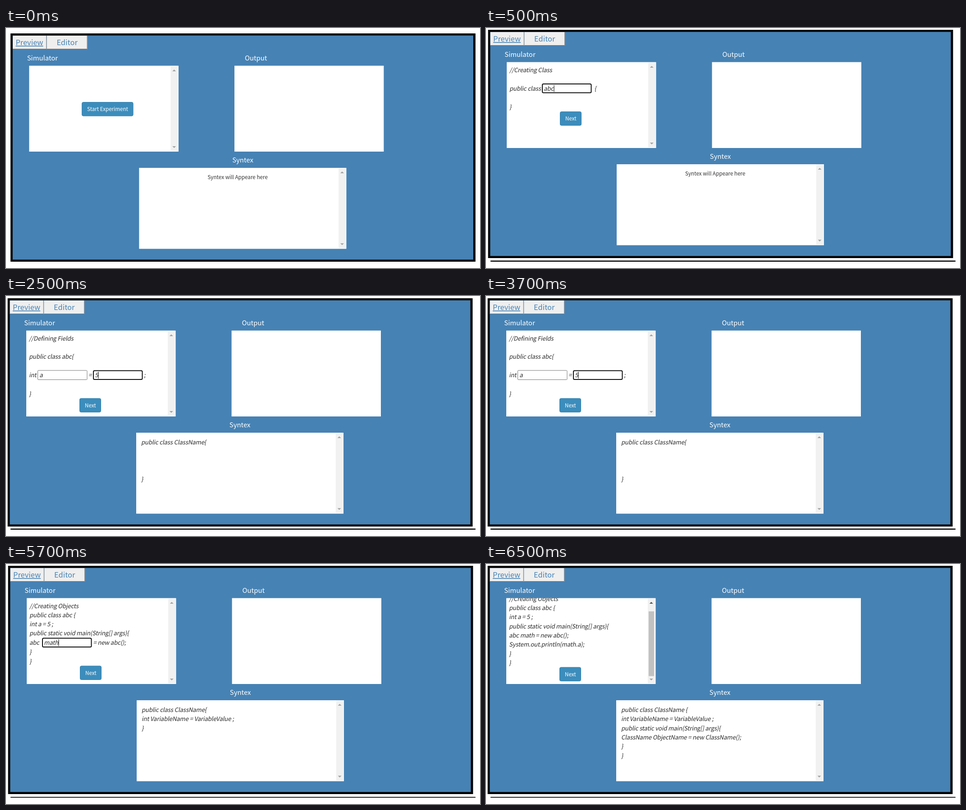
Recreate the animation shown at these times as an HTML page. Size 1052 by 532 pixels, loop 8000 ms.

```html
<!DOCTYPE html>
<html lang="en">
<head>
<meta charset="utf-8">
<title>Class simulator</title>
<style>
html, body { margin: 0; width: 100%; height: 100%; overflow: hidden; background: #fff; }
svg { display: block; width: 1052px; height: 532px; }
text { font-family: "Noto Sans CJK JP", "Noto Sans CJK SC", "Noto Sans CJK KR", "Noto Sans CJK TC", "Noto Sans", sans-serif; }
.tab { font-size: 16.4px; fill: #4682b4; }
.label { font-size: 14.9px; fill: #fff; }
.hint { font-size: 11.7px; fill: #333; }
.btn { font-size: 11.6px; font-weight: 500; fill: #fff; }
.code { font-size: 13.25px; letter-spacing: -.165px; fill: #2b2b2b; }
</style>
</head>
<body>
<svg id="stage" viewBox="0 0 1052 532"></svg>
<script>
const LOOP = 8000, LINE = 20.3;
const stage = document.getElementById('stage');

const rect = (x, y, w, h, fill, more = '') =>
  `<rect x="${x}" y="${y}" width="${w}" height="${h}" fill="${fill}" ${more}/>`;
const text = (kind, x, y, s, more = '') =>
  `<text class="${kind}" x="${x}" y="${y}" ${more}>${s}</text>`;
const code = (x, y, s) =>
  `<text class="code" transform="translate(${x} ${y}) skewX(-11)">${s}</text>`;
const lines = (x, y, list) => list.map((s, i) => code(x, y + i * LINE, s)).join('');

const arrow = (x, y, dir, fill = '#a3a3a3') =>
  `<path d="M${x - 4} ${y + 2 * dir}h8l-4 ${-4 * dir}z" fill="${fill}"/>`;

function scrollbar(x, top, bottom, upFill) {
  return rect(x, top, 16, bottom - top, '#f1f1f1')
    + arrow(x + 7.8, top + 9, 1, upFill) + arrow(x + 7.8, bottom - 8.5, -1);
}

function tab(x, w, textX, s, more) {
  return rect(x, 9, w, 30, '#efefef')
    + `<path d="M${x + w - .5} 9v29.5h${.5 - w}" fill="none" stroke="#767676"/>`
    + text('tab', textX, 30.3, s, more);
}

function button(x, y, w, s) {
  return rect(x + .5, y + .5, w - 1, 30.5, '#3c8dbc', 'rx="3" stroke="#367fa9"')
    + text('btn', x + 12, y + 20.4, s);
}

function input(x, y, s, caret) {
  const look = caret ? 'rx="2.5" stroke="#101010" stroke-width="2"' : 'rx="1.5" stroke="#767676"';
  const pad = caret ? 1 : .5;
  return rect(x + pad, y + pad, 110.5 - 2 * pad, 21.5 - 2 * pad, '#fff', look)
    + code(x + 4.3, y + 15.7, s)
    + (caret ? rect(caret, y + 3.5, 1, 15, '#000') : '');
}

const hint = text('hint', 442, 327, 'Syntex will Appeare here');

// at: start time, dx/dy: window offset, rule: top of the line under the window
const scenes = [
  { at: 0, dx: 5.4, dy: 8,
    sim: button(162.7, 156, 114.5, 'Start Experiment'),
    syntax: hint },
  { at: 500, dx: 0, dy: 0, rule: 515.5,
    sim: code(52, 97.5, '//Creating Class') + code(52, 138.7, 'public class')
      + input(124, 123, 'abc', 150.5) + code(240.5, 138.7, '{') + code(52, 180, '}')
      + button(164, 185, 48, 'Next'),
    syntax: hint },
  { at: 2500, dx: -1, dy: 1, rule: 515.5,
    sim: code(52, 97.5, '//Defining Fields') + code(52, 138, 'public class abc{')
      + code(52, 179.3, 'int') + input(71, 163.5, 'a') + code(184, 179.3, '=')
      + input(194, 163.5, '5', 205.5) + code(307, 179.3, ';') + code(52, 221, '}')
      + button(164, 225.5, 48, 'Next'),
    syntax: code(301, 328, 'public class ClassName{') + code(301, 409.5, '}') },
  { at: 4500, dx: 0, dy: 0, rule: 516.3,
    sim: lines(52, 97.5, ['//Creating Objects', 'public class abc {', 'int a = 5 ;',
        'public static void main(String[] args){'])
      + code(52, 179.2, 'abc') + input(80, 163.5, 'math', 116.5)
      + code(193.5, 179.2, '= new abc();') + lines(52, 200.2, ['}', '}'])
      + button(164, 225.5, 48, 'Next'),
    syntax: lines(301, 328, ['public class ClassName{', 'int VariableName = VariableValue ;', '}']) },
  { at: 6500, dx: -1, dy: 0, rule: 516.3, scrolled: true,
    sim: lines(52, 81.7, ['//Creating Objects', 'public class abc {', 'int a = 5 ;',
        'public static void main(String[] args){', 'abc math = new abc();',
        'System.out.println(math.a);', '}', '}'])
      + button(164, 228.5, 48, 'Next'),
    syntax: lines(301, 328, ['public class ClassName {', 'int VariableName = VariableValue ;',
        'public static void main(String[] args){', 'ClassName ObjectName = new ClassName();', '}', '}']) }
];

function draw(s) {
  const bar = scrollbar(360, 77, 264.5, s.scrolled ? '#505050' : undefined)
    + (s.scrolled ? rect(362, 105, 12, 143.5, '#c1c1c1') : '');
  return (s.rule ? rect(10, s.rule, 1032, 518 - s.rule, '#000') : '')
    + `<g transform="translate(${s.dx} ${s.dy})">`
    + rect(4.6, 4, 1032, 506, '#000') + rect(9.4, 8.6, 1022.2, 496.8, '#4682b4')
    + tab(9.6, 75.2, 16, 'Preview', 'text-decoration="underline"')
    + tab(85.2, 90, 107, 'Editor')
    + text('label', 41.3, 63.8, 'Simulator') + text('label', 524.5, 63.8, 'Output')
    + text('label', 496.8, 290.2, 'Syntex')
    + rect(46, 75.6, 331.5, 190.4, '#fff') + rect(501.6, 75.6, 331.4, 190.4, '#fff')
    + rect(290, 302, 460, 179.5, '#fff')
    + '<clipPath id="view"><rect x="46" y="75.6" width="314" height="190"/></clipPath>'
    + `<g clip-path="url(#view)">${s.sim}</g>` + bar
    + s.syntax + scrollbar(732.8, 303, 479.8) + '</g>';
}

let shown;
function tick() {
  const t = performance.now() % LOOP;
  const scene = scenes.findLast(s => s.at <= t);
  if (scene !== shown) {
    stage.innerHTML = draw(scene);
    shown = scene;
  }
  requestAnimationFrame(tick);
}
tick();
</script>
</body>
</html>
```
